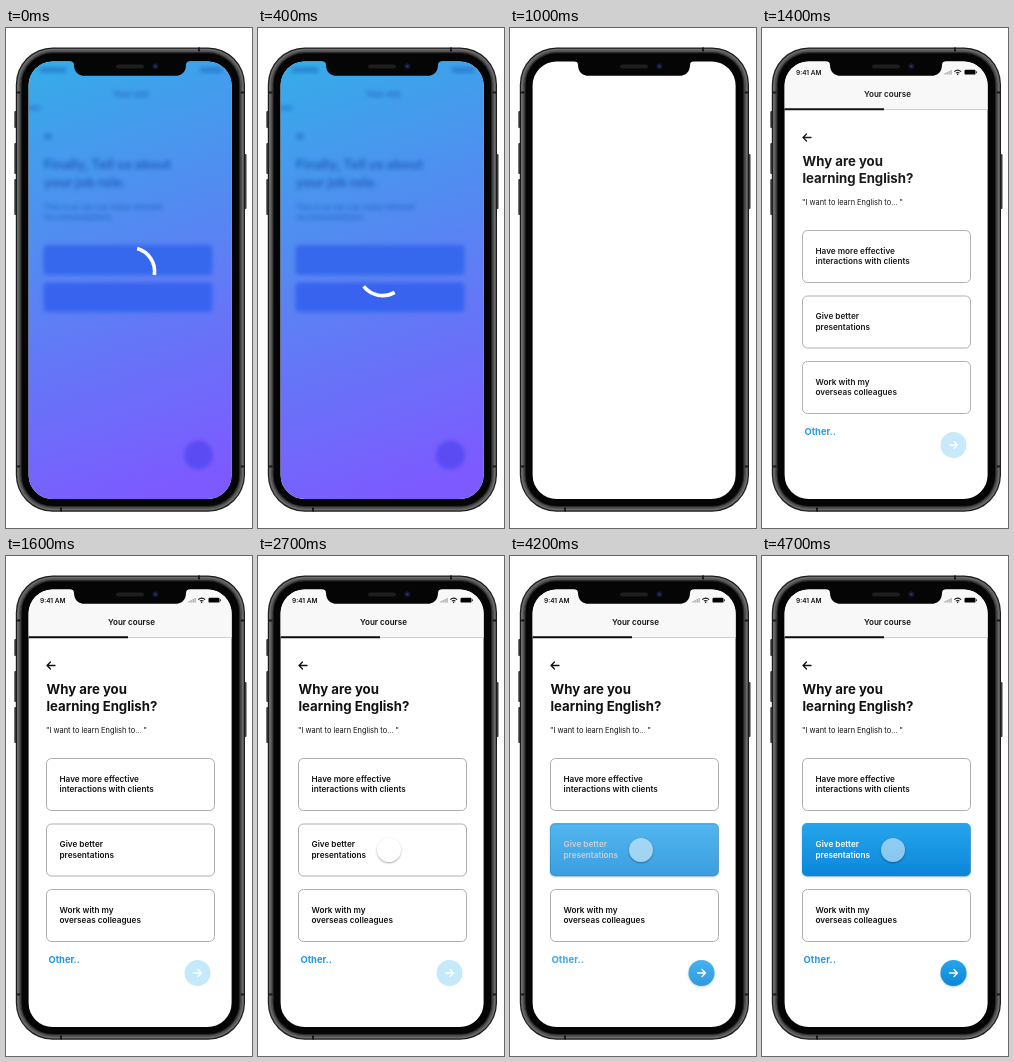
An HTML page that plays this animation: 246x500 px, repeating every 4800 ms.

```html
<!DOCTYPE html>
<html lang="en">
<head>
<meta charset="utf-8">
<title>Course setup</title>
<style>
  html, body { margin: 0; width: 100%; height: 100%; overflow: hidden; background: #fff; }
  svg { position: absolute; left: 0; top: 0; display: block; }
  text { font-family: Inter, "Open Sans", sans-serif; fill: #111; }
  .label { font-size: 8.2px; font-weight: 600; }
  .white { fill: #fff; }
  .blurred text { fill: #1a55b4; }
  .other { font-size: 9.3px; font-weight: 700; fill: #1d97e6; }
  .card { fill: #fff; stroke: #adadad; }
  .arrow { fill: none; stroke-width: 1.3; stroke-linecap: round; stroke-linejoin: round; }
  #touch {
    position: absolute; left: 119px; top: 282px; width: 24px; height: 24px;
    border-radius: 50%; background: rgba(255, 255, 255, .5);
    box-shadow: 0 1px 2px rgba(0, 0, 0, .36); opacity: 0;
  }
</style>
</head>
<body>
<svg width="246" height="500" viewBox="0 0 246 500">
  <defs>
    <clipPath id="display"><rect x="22.6" y="33.5" width="203" height="437.5" rx="24"/></clipPath>
    <linearGradient id="sky" gradientUnits="userSpaceOnUse" x1="42" y1="26" x2="196" y2="450">
      <stop offset="0" stop-color="#35ade8"/>
      <stop offset="1" stop-color="#7d5aff"/>
    </linearGradient>
    <linearGradient id="blue" x1="0" y1="0" x2="0" y2="1">
      <stop offset="0" stop-color="#27a5ec"/>
      <stop offset="1" stop-color="#0b86d8"/>
    </linearGradient>
    <filter id="soft" x="-20%" y="-20%" width="140%" height="140%"><feGaussianBlur stdDeviation="2"/></filter>
    <filter id="lift" x="-20%" y="-20%" width="140%" height="150%">
      <feDropShadow dx="0" dy="1" stdDeviation="1" flood-color="#0b6fb5" flood-opacity=".35"/>
    </filter>
  </defs>

  <!-- phone body -->
  <g fill="#3a3a3a">
    <rect x="8.3" y="83" width="3" height="17" rx="1"/>
    <rect x="8.3" y="115" width="3" height="31" rx="1"/>
    <rect x="8.3" y="151" width="3" height="36" rx="1"/>
    <rect x="237.5" y="126" width="3" height="55" rx="1"/>
  </g>
  <g id="body"></g>
  <path d="M10 64.500h4.500M234.500 64.500h4.500M10 438.500h4.500M234.500 438.500h4.500M55 479.500v4M193 19.500v4" stroke="#1a1a1a" stroke-width="2"/>
  <rect x="22.6" y="33.5" width="203" height="437.5" rx="24" fill="#fff"/>

  <g clip-path="url(#display)">
    <g id="form">
      <rect x="22" y="33" width="204" height="48" fill="#f8f8f9"/>
      <path d="M22 81.5H226" stroke="#cfcfd1"/>
      <path d="M22 81.3H122" stroke="#0b0b0b" stroke-width="2"/>
      <text x="34" y="46.6" font-size="6.5" font-weight="600">9:41 AM</text>
      <g fill="#aaa">
        <rect x="182.5" y="45" width="1.3" height="1.6"/><rect x="184.5" y="44" width="1.3" height="2.6"/>
        <rect x="186.5" y="43" width="1.3" height="3.6"/><rect x="188.5" y="42" width="1.3" height="4.6"/>
      </g>
      <path d="M192.3 43.6Q195.7 40.6 199.1 43.6M193.9 45.2Q195.7 43.7 197.5 45.2" fill="none" stroke="#111" stroke-width="1.1"/>
      <circle cx="195.7" cy="46.3" r=".7"/>
      <rect x="202.5" y="41.8" width="11" height="4.8" rx="1.2"/>
      <rect x="214" y="43.3" width=".8" height="1.8"/>
      <text x="125.5" y="69" font-size="8.05" font-weight="600" text-anchor="middle">Your course</text>
      <path class="arrow" stroke="#111" d="M49 109.5H41M44.5 106L41 109.5L44.5 113"/>
      <g font-size="13.2" font-weight="700">
        <text x="40.5" y="138">Why are you</text>
        <text x="40.5" y="155">learning English?</text>
      </g>
      <text x="40" y="177" font-size="7.4">"I want to learn English to... "</text>
      <g id="cards"></g>
      <text class="other" id="otherIdle" x="42.5" y="407">Other..</text>
      <circle cx="191.5" cy="417" r="13" fill="#c5e9fa"/>
      <g id="picked">
        <rect x="40" y="267" width="168.5" height="53" rx="5" fill="url(#blue)" filter="url(#lift)"/>
        <text class="label white" x="53.5" y="291">Give better</text>
        <text class="label white" x="53.5" y="301.6">presentations</text>
        <text class="other" x="41.5" y="407" letter-spacing=".2">Other..</text>
        <circle cx="191.5" cy="417" r="13" fill="url(#blue)" filter="url(#lift)"/>
      </g>
      <path class="arrow" stroke="#fff" d="M187.5 417H195.5M192 413.5L195.5 417L192 420.5"/>
    </g>

    <g id="loader">
      <rect x="22" y="33" width="204" height="439" fill="url(#sky)"/>
      <g class="blurred" filter="url(#soft)">
        <g fill="#1757b8" opacity=".6">
          <rect x="34" y="40" width="26" height="4"/>
          <rect x="194" y="40" width="22" height="4"/>
          <rect x="22" y="78.5" width="12" height="3"/>
          <rect x="39" y="106" width="6" height="5"/>
        </g>
        <g opacity=".78">
          <text x="125" y="69" font-size="8" font-weight="600" text-anchor="middle">Your Job</text>
          <g font-size="12.8" font-weight="700">
            <text x="38" y="140.5">Finally, Tell us about</text>
            <text x="38" y="158.5">your job role.</text>
          </g>
          <g font-size="7.9">
            <text x="38" y="181.5">This is so we can make relevant</text>
            <text x="38" y="191.500">recommendations.</text>
          </g>
        </g>
        <rect x="37.5" y="217" width="169" height="30" rx="4" fill="#3568ec"/>
        <rect x="37.5" y="254.5" width="169" height="29.5" rx="4" fill="#3764ef"/>
        <circle cx="192.5" cy="427" r="14.5" fill="#5a4cf3"/>
      </g>
      <path id="arc" fill="none" stroke="#fff" stroke-width="3.6"/>
    </g>
  </g>

  <!-- notch -->
  <path d="M64 33Q68 33.500 68 37Q68.500 47.800 79 47.800H169Q179.500 47.800 180 37Q180 33.500 184 33Z" fill="#050505"/>
  <rect x="110" y="36.5" width="28" height="4" rx="2" fill="#1e1e20"/>
  <circle cx="149.3" cy="38.3" r="3" fill="#14172b"/>
  <circle cx="149.3" cy="38.3" r="1.3" fill="#27306b"/>
</svg>
<div id="touch"></div>

<script>
  const LOOP = 4800, STEP = 100;
  const $ = id => document.getElementById(id);

  // nested metal rims: inset and shade
  const rims = [[0, "#1c1c1c"], [1.2, "#6a6a6a"], [3, "#505050"], [4.6, "#2c2c2c"], [5.8, "#050505"]];
  $("body").innerHTML = rims.map(([d, shade]) => `
    <rect x="${9.8 + d}" y="${19.5 + d}" width="${229.2 - 2 * d}" height="${464.3 - 2 * d}"
      rx="${37 - d}" fill="${shade}"/>`).join("");

  const options = [
    [202, "Have more effective", "interactions with clients"],
    [267.5, "Give better", "presentations"],
    [333, "Work with my", "overseas colleagues"]
  ];
  $("cards").innerHTML = options.map(([y, a, b]) => `
    <rect class="card" x="40.5" y="${y + .5}" width="168" height="52" rx="5"/>
    <text class="label" x="53.5" y="${y + 23.5}">${a}</text>
    <text class="label" x="53.5" y="${y + 34.1}">${b}</text>`).join("");

  const clamp = v => Math.min(1, Math.max(0, v));
  const span = (t, from, to) => clamp((t - from) / (to - from));
  const easeOut = p => 1 - (1 - p) ** 2;
  const easeInOut = p => p * p * (3 - 2 * p);

  function arcPath(start, sweep) {
    const point = deg => {
      const a = deg * Math.PI / 180;
      return `${124.6 + 24 * Math.cos(a)} ${243.6 + 24 * Math.sin(a)}`;
    };
    return `M${point(start)}A24 24 0 0 1 ${point(start + sweep)}`;
  }

  function draw(t) {
    $("loader").style.display = t < 1000 ? "" : "none";
    $("arc").setAttribute("d", arcPath(-74 + t * .3345, 82));
    $("form").style.opacity = easeOut(span(t, 1000, 1500));
    $("touch").style.opacity = easeOut(span(t, 2000, 2500));
    const picked = easeInOut(span(t, 3700, 4400));
    $("picked").style.opacity = picked;
    $("otherIdle").style.opacity = 1 - picked;
  }

  const begin = performance.now();
  function tick() {
    const t = (performance.now() - begin) % LOOP;
    draw(Math.floor(t / STEP) * STEP);
    requestAnimationFrame(tick);
  }
  tick();
</script>
</body>
</html>
```
